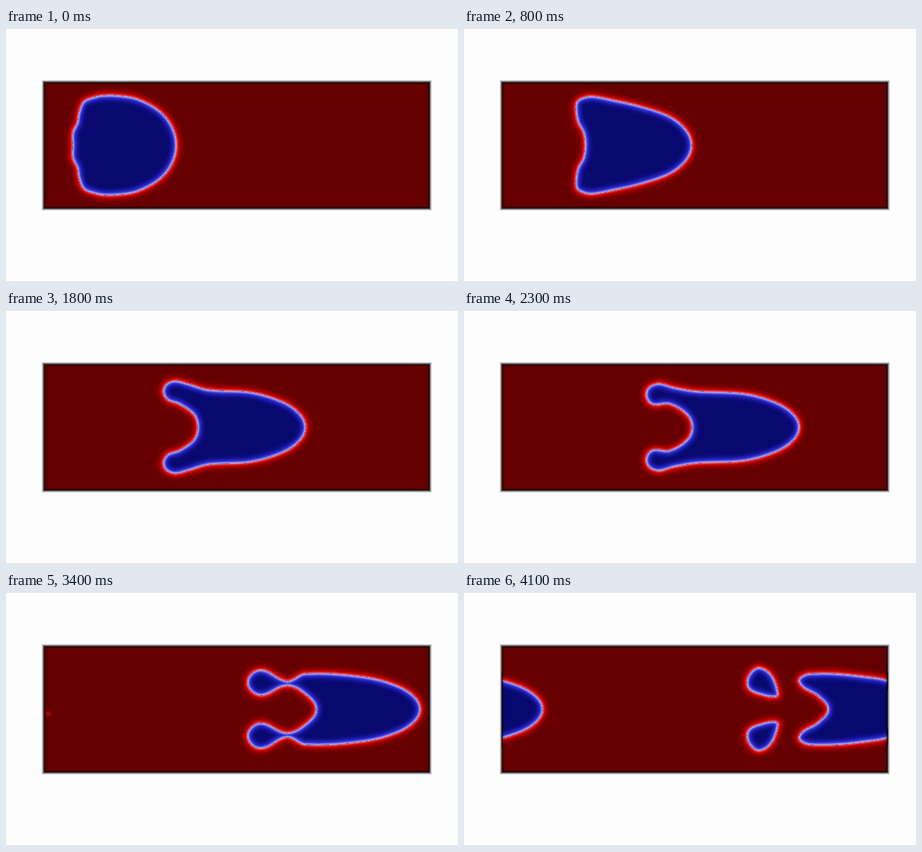
An HTML page with a canvas that plays this animation: 600 by 338 pixels, repeating every 4.2 s.

```html
<!DOCTYPE html>
<html>
<head>
<meta charset="utf-8">
<style>
html, body { margin: 0; width: 100%; height: 100%; overflow: hidden; background: #fefdfe; }
canvas { display: block; }
</style>
</head>
<body>
<canvas id="stage" width="600" height="338"></canvas>
<script>
const ctx = document.getElementById('stage').getContext('2d');
const LOOP = 4200, STEP = 100, SPLIT = 3.5;
const AXIS = 156, PERIOD = 512, REACH = 12;
const BOX = [50.4, 72.3, 511.8, 167.6];

// Colour by distance from the interface, negative inside the drop.
function color(d) {
  const glow = Math.exp(-((d / 6) ** 2));
  const white = 135 * Math.exp(-((d / 2) ** 2));
  const outside = 1 / (1 + Math.exp(-2 * d));
  const mix = (inner, outer) => inner + (outer - inner) * outside;
  const tint = 8 + 45 * glow;
  return `rgb(${mix(tint, 102 + 138 * glow) + white * (1 - outside)},
    ${mix(tint, 0) + white}, ${mix(110 + 135 * glow, 0) + white * outside})`;
}

const mirror = points => points.map(([x, y]) => [x, 2 * AXIS - y]).reverse();
const closeHalf = half => half.concat(mirror(half.slice(1, -1)));

// Closed outlines of the drop, s in seconds; the upper half is built and mirrored.
function dropLoops(s) {
  const q = s * s, settle = Math.exp(-s / 0.4);

  const nose = 226 + 95.2 * s;
  const length = 115 - 33 * settle, height = 44 + 22 * Math.exp(-s / 1.3);
  const front = [[nose, AXIS]];
  for (const a of [0.38, 0.76, 1.2]) {
    front.push([nose - length * (1 - Math.cos(a)), AXIS - height * Math.sin(a)]);
  }
  front.push([146 + 62 * s + 3.5 * q, 109 - 19 * Math.exp(-q / 1.6)]);

  const tail = 89 + 89 * s + 1.75 * q;
  const cavity = [[tail - 3 * s, 139], [tail, AXIS]];

  // The trailing lobe curls round until it becomes a separate droplet.
  const x = 119 + 50 * s + 4.2 * q;
  const y = 113 - 8 * Math.cos((s - 1) / 0.86) + 4 * settle;
  const r = 12 + 10 * settle + 0.4 * q;
  const sweep = Math.PI / 2 * (1 + s / 3.4);
  const lobe = [0, 0.5, 1].map(k => [x - r * Math.sin(sweep * k), y - r * Math.cos(sweep * k)]);

  if (s < SPLIT) {
    const neckTop = [x + 10 + 2.2 * q, 90 + 2.5 * q];
    const neckBottom = [x - 24 + 17.6 * s, 126 - 0.5 * s];
    return [closeHalf([...front, neckTop, ...lobe, neckBottom, ...cavity])];
  }
  const retract = 20 * (s - SPLIT);
  const droplet = [[x + 34 - retract, y + 3 + retract], ...lobe];
  return [closeHalf([...front, [tail - 38, 120], ...cavity]), droplet, mirror(droplet)];
}

// Smooth closed curve through the points.
function addLoop(path, pts, dx) {
  const n = pts.length, at = i => pts[(i + n) % n];
  const handle = (i, len) => {
    const [x0, y0] = at(i - 1), [x1, y1] = at(i + 1), k = 0.36 * len / Math.hypot(x1 - x0, y1 - y0);
    return [(x1 - x0) * k, (y1 - y0) * k];
  };
  path.moveTo(pts[0][0] + dx, pts[0][1]);
  for (let i = 0; i < n; i++) {
    const a = at(i), b = at(i + 1), len = Math.hypot(b[0] - a[0], b[1] - a[1]);
    const u = handle(i, len), v = handle(i + 1, len);
    path.bezierCurveTo(a[0] + u[0] + dx, a[1] + u[1], b[0] - v[0] + dx, b[1] - v[1], b[0] + dx, b[1]);
  }
  path.closePath();
}

function strokeBands(path, side) {
  for (let d = REACH; d > 0; d -= 0.5) {
    ctx.lineWidth = 2 * d;
    ctx.strokeStyle = color(side * d);
    ctx.stroke(path);
  }
}

// First trace of the nose as it comes back at the left wall.
function drawSpot(s) {
  if (s < 3.4 || s >= 3.6) return;
  const r = 60 * (s - 3.3);
  const glow = ctx.createRadialGradient(56, 162, 0, 56, 162, r);
  glow.addColorStop(0, 'rgba(215,8,8,0.9)');
  glow.addColorStop(1, 'rgba(120,0,0,0)');
  ctx.fillStyle = glow;
  ctx.fillRect(56 - r, 162 - r, 2 * r, 2 * r);
}

function draw(s) {
  ctx.fillStyle = '#fefdfe';
  ctx.fillRect(0, 0, 600, 338);
  ctx.fillStyle = '#e4e3e4';
  ctx.fillRect(0, 0, 600, 1);
  ctx.fillRect(0, 337, 600, 1);

  const path = new Path2D();
  for (const loop of dropLoops(s)) for (const dx of [0, -PERIOD]) addLoop(path, loop, dx);

  ctx.save();
  ctx.beginPath();
  ctx.rect(...BOX);
  ctx.clip();
  ctx.fillStyle = color(3 * REACH);
  ctx.fillRect(...BOX);
  ctx.lineJoin = 'round';
  strokeBands(path, 1);
  drawSpot(s);
  ctx.clip(path);
  ctx.fillStyle = color(-3 * REACH);
  ctx.fill(path);
  strokeBands(path, -1);
  ctx.restore();

  for (const width of [6, 4.5, 3, 1.6]) {
    ctx.lineWidth = width;
    ctx.strokeStyle = `rgba(0,0,0,${0.8 / width})`;
    ctx.strokeRect(...BOX);
  }
}

function frame() {
  const t = performance.now() % LOOP;
  draw(Math.floor(t / STEP) * STEP / 1000);
  requestAnimationFrame(frame);
}
frame();
</script>
</body>
</html>
```
